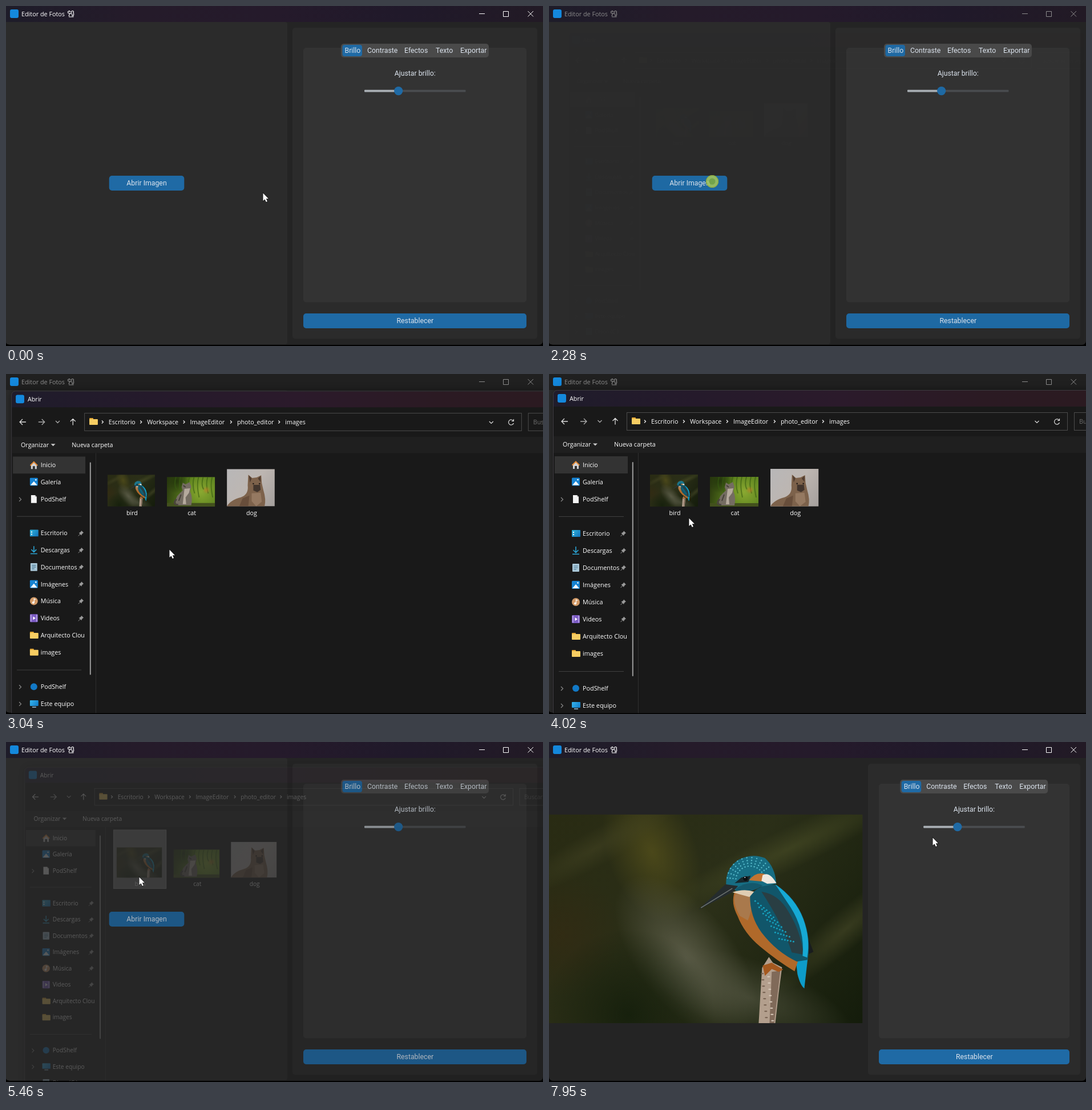
An HTML page with a canvas that plays this animation: 941 px wide and 595 px high, repeating every 8 s.

```html
<!DOCTYPE html>
<html lang="es">
<head>
<meta charset="utf-8">
<title>Editor de Fotos</title>
<style>
html, body { margin: 0; width: 100%; height: 100%; overflow: hidden; background: #000; }
canvas { display: block; }
</style>
</head>
<body>
<canvas id="stage" width="941" height="595"></canvas>
<script>
const W = 941, H = 595, LOOP = 8000;
const screen2d = document.getElementById('stage').getContext('2d');
const layer = Object.assign(document.createElement('canvas'), { width: W, height: H });
const layer2d = layer.getContext('2d');
let c = screen2d;

const UI = '12.3px Roboto, sans-serif';
const SYS = '10.8px "Open Sans", sans-serif';
const BLUE = '#1f6aa5', PALE = '#dce4ee', PANEL = '#2b2b2b', BACK = '#242424';

const clamp = v => Math.max(0, Math.min(1, v));
const ramp = (t, a, b) => clamp((t - a) / (b - a));

// ---- drawing helpers ----
function box(x, y, w, h, r, fill) {
  c.beginPath();
  c.roundRect(x, y, w, h, r);
  c.fillStyle = fill;
  c.fill();
}
function text(s, x, y, font, color, align = 'left') {
  c.font = font;
  c.textAlign = align;
  c.fillStyle = color;
  c.fillText(s, x, y);
}
function fill(d, color) {
  c.fillStyle = color;
  c.fill(new Path2D(d));
}
function stroke(d, color, width = 1) {
  c.strokeStyle = color;
  c.lineWidth = width;
  c.stroke(new Path2D(d));
}
function disc(x, y, r, color) {
  c.beginPath();
  c.arc(x, y, r, 0, 7);
  c.fillStyle = color;
  c.fill();
}
function at(x, y, draw, s = 1) {
  c.save();
  c.translate(x, y);
  c.scale(s, s);
  draw();
  c.restore();
}
function gradient(x0, y0, x1, y1, ...colors) {
  const g = c.createLinearGradient(x0, y0, x1, y1);
  colors.forEach((k, i) => g.addColorStop(i / (colors.length - 1), k));
  return g;
}
function glow(x, y, r, rgb, alpha, tilt = 0, flat = 1) {
  c.save();
  c.translate(x, y);
  c.rotate(tilt);
  c.scale(1, flat);
  const g = c.createRadialGradient(0, 0, 0, 0, 0, r);
  g.addColorStop(0, `rgba(${rgb},${alpha})`);
  g.addColorStop(1, `rgba(${rgb},0)`);
  c.fillStyle = g;
  c.fillRect(-r, -r, 2 * r, 2 * r);
  c.restore();
}
function photo(x, y, w, h, draw, width) {
  c.save();
  c.beginPath();
  c.rect(x, y, w, h);
  c.clip();
  c.translate(x, y);
  c.scale(w / width, w / width);
  draw();
  c.restore();
}

// ---- pictures ----
function bird() {
  c.fillStyle = gradient(0, 0, 549, 366, '#292b13', '#2b2f18', '#141c0b');
  c.fillRect(0, 0, 549, 366);
  glow(180, 65, 130, '92,86,28', .65, 1.2, .6);
  glow(20, 210, 110, '56,42,18', .5);
  glow(240, 250, 170, '104,104,84', .75, .9, .5);
  glow(350, 320, 190, '88,90,70', .6, .35, .35);
  glow(420, 60, 260, '74,78,38', .6, -.45, .14);
  glow(520, 200, 170, '72,74,40', .6, -.7, .2);
  glow(80, 60, 160, '70,70,36', .5, -.5, .2);
  glow(140, 350, 150, '14,26,8', .7);
  c.translate(0, -127);
  fill('M373 395L385 376L392 386L408 394L402 440L396 493H367Z', '#b39f8d');
  fill('M390 402L405 400L394 493H386Z', '#806a59');
  for (let i = 0; i < 16; i++)
    box(371 + i * 11 % 21, 404 + i * 5.5, 5, 2, 1, i % 2 ? '#d8cabb' : '#75604f');
  fill('M432 380L453 378L447 431Q440 426 435 406Z', '#0d9cc9');
  fill('M455 346L463 367L452 372Z', '#191c1d');
  fill('M325 262Q318 282 330 304Q342 335 370 358Q400 383 430 401L436 383L385 310L358 264Z', '#b0692a');
  fill('M326 266Q321 282 334 304L348 312Q358 290 353 266Z', '#a9794c');
  fill('M374 391L390 386L410 398L402 402L390 397L378 409Z', '#a5591f');
  fill('M352 268Q372 246 398 250Q432 273 446 310Q459 346 453 381L434 384Q398 367 372 333Q351 304 352 268Z', '#11566a');
  fill('M372 262Q402 266 420 298Q440 330 446 372L425 368Q410 320 372 262Z', '#293e43');
  fill('M396 249Q431 273 445 309Q458 344 452 377L444 374Q448 328 423 289Z', '#16a9d5');
  fill('M310 249Q309 221 332 206Q355 194 378 203Q396 219 398 248L382 251L330 262Z', '#176d83');
  fill('M327 257Q350 240 374 251Q362 261 330 265Z', '#14586c');
  fill('M350 242Q362 226 378 231L373 244Z', '#c27431');
  fill('M374 233Q386 226 398 247L382 248L372 243Z', '#eee8df');
  fill('M321 263Q342 256 359 262L351 271Z', '#dfcdb3');
  fill('M262 293L309 249L331 252L321 263Z', '#252c2e');
  stroke('M266 290L321 256', '#6e7472', 1.5);
  fill('M325 247L337 237L353 234L349 245Z', '#17272c');
  disc(344, 239, 4, '#0a0e10');
  disc(343, 237, 1, '#dde');
  for (let i = 0; i < 48; i++) {
    const a = 3.25 + i % 12 * .22, r = 25 + (i / 12 | 0) * 5;
    disc(352 + r * Math.cos(a), 242 + r * Math.sin(a), 1.2, '#55b9c9');
  }
  for (let i = 0; i < 42; i++) {
    const row = i / 6 | 0, col = i % 6;
    disc(361 + row * 7 + col * 5, 278 + row * 11 + col * 4 - row * col * .5, 1.5, '#16a0bd');
  }
}
function cat() {
  c.fillStyle = gradient(0, 0, 85, 20, '#27350e', '#5e831e', '#638922');
  c.fillRect(0, 0, 85, 52);
  glow(60, 26, 30, '156,184,56', .7);
  glow(18, 7, 22, '30,48,10', .8);
  for (let i = 0; i < 9; i++)
    stroke(`M${16 + i * 8} 0Q${12 + i * 8} 14 ${17 + i * 8} ${22 + i % 3 * 7}`, 'rgba(55,92,18,.6)', 2);
  glow(70, 23, 7, '191,126,40', .7);
  box(0, 46, 85, 6, 0, '#43511d');
  fill('M26 18L28 10L33 13L40 9L43 17L41 25Q46 36 43 50H18Q13 44 18 34Q24 27 28 24Z', '#746c61');
  fill('M31 21L41 20L39 28L33 36L34 48H28Z', '#b5aa9d');
  stroke('M20 49Q9 48 17 39', '#4a443d', 3);
  stroke('M25 31L21 42M29 15L33 18', '#453f38', 2);
}
function dog() {
  c.fillStyle = gradient(0, 0, 85, 66, '#b8b7b8', '#bdb6b1', '#a5a09d');
  c.fillRect(0, 0, 85, 66);
  fill('M0 66Q6 55 25 50Q39 45 37 29L38 10L45 16L53 15L61 11L62 25L65 38Q70 54 67 66Z', '#7d624b');
  fill('M39 11L44 17L41 24ZM60 12L55 17L60 23Z', '#513d30');
  fill('M47 28L59 28L60 37L54 41L47 38Z', '#42352d');
  fill('M44 43L60 42L62 58L52 66L44 57Z', '#957961');
  fill('M28 52L40 47L38 66H22Z', '#684e3b');
  disc(47, 26, 1.3, '#211a17');
  disc(58, 26, 1.3, '#211a17');
}

// ---- sidebar icons, each in a 14 px box ----
const folder = () => {
  box(0, 1, 7, 5, 1, '#e2a431');
  box(0, 3, 15, 10, 1, '#f7cd62');
};
const picture = () => {
  box(0, 0, 14, 14, 1.5, '#1683d2');
  fill('M1 13L7 6L13 13Z', '#f3f8fc');
  disc(10.5, 3.5, 1.3, '#fff');
};
const monitor = () => {
  box(0, 1, 15, 10, 1, gradient(0, 0, 15, 10, '#38b6ee', '#107cc8'));
  box(4, 12, 7, 2, 0, '#7e9cb0');
};
const icons = {
  home() {
    fill('M2 7L7 2L12 7V14H9V9H5V14H2Z', '#d2d2d4');
    stroke('M.7 7.8L7 1.4L13.3 7.8', '#e58a35', 2);
  },
  picture, folder, monitor,
  page() {
    fill('M2 0H9L12 3V14H2Z', '#f4f4f4');
    fill('M9 0V3H12Z', '#bbb');
  },
  desktop() {
    box(0, 1, 15, 12, 1, gradient(0, 0, 15, 12, '#30b7dc', '#1272ba'));
    box(2, 4, 2, 2, 0, '#fff');
    box(2, 8, 2, 2, 0, '#fff');
  },
  down() { stroke('M7 0V10M2.5 6L7 10.5L11.5 6M1 13.3H13', '#2ba4d3', 1.6); },
  doc() {
    box(1, 0, 12, 14, 1, '#a9c7d8');
    stroke('M3.5 4H10.5M3.5 7H10.5M3.5 10H8', '#41728f', 1.2);
  },
  music() {
    disc(7, 7, 7, '#d29a67');
    disc(6, 9.5, 2, '#fff');
    stroke('M7.5 9.5V3L10.5 4.5', '#fff', 1.3);
  },
  video() {
    box(0, 0, 14, 14, 1.5, '#7c5cc4');
    stroke('M2 1V13M12 1V13', '#c9b8ef', 1.3);
    fill('M5.5 4L10 7L5.5 10Z', '#fff');
  },
  cloud() { disc(7, 7, 6, '#1279c6'); }
};
// label, icon, centre y, pinned, expandable
const rows = [
  ['Inicio', 'home', 159], ['Galería', 'picture', 188.5], ['PodShelf', 'page', 219, 0, 1],
  ['Escritorio', 'desktop', 279, 1], ['Descargas', 'down', 309, 1], ['Documentos', 'doc', 339, 1],
  ['Imágenes', 'picture', 369, 1], ['Música', 'music', 399, 1], ['Videos', 'video', 429, 1],
  ['Arquitecto Clou', 'folder', 459], ['images', 'folder', 489],
  ['PodShelf', 'cloud', 550, 0, 1], ['Este equipo', 'monitor', 580, 0, 1], ['Disco (C:)', 'doc', 610, 0, 1]
];
const crumbs = [['Escritorio', 179], ['Workspace', 247], ['ImageEditor', 323], ['photo_editor', 406], ['images', 491]];
const files = [
  ['bird', 177, 176, 84, 56, bird, 549], ['cat', 282, 180, 85, 52, cat, 85], ['dog', 388, 166, 84.5, 66, dog, 85]
];

function dialog(itemColor) {
  c.save();
  c.shadowColor = 'rgba(0,0,0,.5)';
  c.shadowBlur = 14;
  box(8, 29, 1004, 626, 7, '#191919');
  c.restore();
  box(8, 29, 1004, 28, [7, 7, 0, 0], gradient(8, 0, 1012, 0, '#1f1c2b', '#251a2b', '#2b1a2b', '#2b1a23', '#2b1a20'));
  c.beginPath();
  c.roundRect(7.5, 28.5, 1005, 627, 7);
  c.strokeStyle = '#3d3b40';
  c.lineWidth = 1;
  c.stroke();
  box(15, 35, 15, 15, 3, '#1488dc');
  text('Abrir', 36, 47, SYS, '#fff');

  stroke('M33 83H22.5M27 78L22 83L27 88M111.5 82L116 77.5L120.5 82M116 78V88.5', '#ddd', 1.3);
  stroke('M55 83H65.5M61 78L66 83L61 88M85.5 81L89 84.5L92.5 81', '#aaa', 1.3);
  c.strokeStyle = '#4c4c4c';
  c.lineWidth = 1;
  c.strokeRect(136.5, 67.5, 772, 31);
  c.strokeRect(920.5, 67.5, 85, 31);
  at(145, 75, folder);
  for (const [label, x] of crumbs) {
    text(label, x, 87, SYS, '#fff');
    stroke(`M${x - 12} 80.5L${x - 9.5} 83L${x - 12} 85.5`, '#eee', 1.3);
  }
  stroke('M851.5 82L855 85.5L858.5 82M894 81A4.6 4.6 0 1 0 894.5 85M894.5 78V81.5H891', '#ddd', 1.2);
  text('Buscar en images', 929, 87, SYS, '#6f6f6f');

  box(8, 109, 1004, 29, 0, '#1f1f1f');
  text('Organizar', 24, 127, SYS, '#fff');
  fill('M77 121.5H85L81 125.5Z', '#ccc');
  text('Nueva carpeta', 114, 127, SYS, '#fff');

  box(10, 144, 128, 30, 0, '#333');
  box(156, 138, 1, 520, 0, '#303030');
  box(17, 249, 114, 1, 0, '#404040');
  box(17, 520, 114, 1, 0, '#404040');
  box(145.8, 154, 2, 375, 1, '#9b9b9b');
  c.save();
  c.beginPath();
  c.rect(8, 138, 131, 520);
  c.clip();
  for (const [label, icon, y, pinned, opens] of rows) {
    at(40, y - 7, icons[icon]);
    text(label, 59, y + 4, SYS, '#fff');
    if (opens) stroke(`M21 ${y - 3}L24.5 ${y + .5}L21 ${y + 4}`, '#8a8a8a', 1.2);
    if (pinned) at(130, y, () => {
      fill('M1 -4.5L5 -.5L3.5 0L1.5 2.5L1 4L-3.5 -.5L-2 -1L.5 -3Z', '#9a9a9a');
      stroke('M-1 1.5L-4.5 5', '#9a9a9a', 1);
    });
  }
  c.restore();

  if (itemColor) {
    box(171, 143.5, 98, 109, 0, itemColor);
    c.strokeStyle = 'rgba(255,255,255,.2)';
    c.strokeRect(171.5, 144, 97, 108);
  }
  for (const [label, x, y, w, h, draw, width] of files) {
    photo(x, y, w, h, draw, width);
    text(label, x + w / 2 + 1.5, 247, SYS, '#fff', 'center');
  }
}

// ---- main window ----
function titleBar(active, tint) {
  box(0, 0, W, 28, 0, '#202020');
  c.globalAlpha = tint;
  box(0, 0, W, 28, 0, gradient(0, 0, W, 0, '#1e1c29', '#251b2a', '#251a2b', '#20192a', '#221a25'));
  c.globalAlpha = 1;
  const ink = active ? '#fff' : '#8c8c8c';
  box(7, 6, 15, 15, 3, '#1488dc');
  text('Editor de Fotos', 27, 18, SYS, ink);
  stroke('M110 19H118.5M110.5 18Q110 14 113 13L109 12.5L108.5 10L111 8.5L113 10.5M113 13Q117 13 116 18' +
    'M117.5 18Q119.5 14 118 12Q119.5 9 116.5 8.5Q113.5 9 115 12', ink, 1.2);
  stroke('M829 13.5H839M871.5 9.5H880.5V18.5H871.5ZM914.5 9L924 18.5M924 9L914.5 18.5', ink, 1);
}

function controls(wide) {
  const left = wide ? 502 : 559, dx = wide ? 0 : 28.2, mid = 716.7 + dx;
  box(left, 38, 931 - left, 544.5, 5, PANEL);
  box(left + 19, 73, 893 - left, 445.5, 5, '#333');
  at(dx, 0, () => {
    box(587, 66, 259, 24, 5, '#4a4a4a');
    box(589.5, 68, 34.5, 20, 4, BLUE);
    for (const [label, x] of [['Brillo', 593.5], ['Contraste', 633], ['Efectos', 698], ['Texto', 753], ['Exportar', 796]])
      text(label, x, 82, UI, PALE);
    box(628, 146.8, 177.5, 3.8, 1, '#4a4d50');
    box(628, 146.8, 58, 3.8, 1, '#aab0b5');
    disc(687.7, 148.6, 7.6, BLUE);
  });
  text('Ajustar brillo:', mid, 122, UI, PALE, 'center');
  box(left + 19, 538, 893 - left, 26, 5, BLUE);
  text('Restablecer', (left + 931) / 2 + .3, 554.8, UI, PALE, 'center');
}

const LOADED = 6560, RELAID = 7025;

function editor(t, hover) {
  box(0, 0, W, H, 0, '#000');
  box(0, 0, W, 593, [0, 0, 7, 7], BACK);
  const active = t < 2230 || t >= 5230;
  titleBar(active, t < 5000 ? 1 - ramp(t, 2290, 2560) : ramp(t, 5230, 5330));
  if (t < LOADED) {
    box(0, 28, 493, 564, [0, 4, 4, 4], PANEL);
    box(180.7, 297, 131.6, 26, 5, hover ? '#144870' : BLUE);
    text('Abrir Imagen', 246.5, 314.2, UI, PALE, 'center');
  }
  controls(t < RELAID);
  if (t < LOADED) return;
  if (t < RELAID) {
    // half-finished repaint of the old layout
    box(490, 28, 59, 564, 0, BACK);
    box(559, 38, 19, 544.5, 0, PANEL);
    box(578, 66, 66, 7, 0, PANEL);
  }
  photo(0, 127, 549.5, 365, bird, 549);
}

// ---- pointer ----
const path = [
  [0, 450, 327], [190, 450, 327], [1000, 365, 316], [1090, 365, 316], [1820, 298, 309], [2100, 286, 307],
  [3100, 286, 307], [3480, 280, 297], [4020, 245, 252], [4380, 235, 239], [4600, 233, 236],
  [5700, 233, 236], [6110, 270, 232], [6910, 447, 187], [7010, 468, 184], [7830, 665, 165],
  [7920, 665, 165], [7950, 672, 167], [LOOP, 672, 167]
];
const clicks = [2270, 4880, 5070];

function pointerAt(t) {
  const i = path.findIndex(p => p[0] > t);
  const [t0, x0, y0] = path[i - 1], [t1, x1, y1] = path[i];
  const k = ramp(t, t0, t1);
  return [x0 + (x1 - x0) * k, y0 + (y1 - y0) * k];
}
function pointer(t, x, y) {
  if (clicks.some(k => Math.abs(t - k) < 75)) {
    disc(x, y, 11, 'rgba(166,200,88,.85)');
    stroke(`M${x - 10.5} ${y}a10.5 10.5 0 1 0 21 0a10.5 10.5 0 1 0 -21 0`, '#8fa637', 1);
    disc(x, y, 5.5, 'rgba(108,158,70,.8)');
    return;
  }
  at(x, y, () => {
    const arrow = 'M.5 .5V14L3.6 11.2L5.8 16L8 15L5.8 10.3H10Z';
    stroke(arrow, '#111', 1.4);
    fill(arrow, '#fff');
  });
}

function frame(now) {
  const t = now % LOOP;
  const [x, y] = pointerAt(t);
  editor(t, t > 1100 && x < 312 && t < 2180);

  const opening = t < 4500;
  const alpha = opening ? ramp(t, 2280, 2680) : 1 - ramp(t, 5250, 5520);
  if (alpha > 0) {
    const s = opening ? 1 - .1 * (1 - ramp(t, 2280, 3480)) ** 2.5 : 1 - .05 * Math.max(0, t - 5250) / 210;
    const [cx, cy] = opening ? [274, 207] : [510, 342];
    c = layer2d;
    c.setTransform(1, 0, 0, 1, 0, 0);
    c.clearRect(0, 0, W, H);
    c.setTransform(s, 0, 0, s, cx * (1 - s), cy * (1 - s));
    dialog(t > 4880 ? '#777' : t > 4025 ? '#4d4d4d' : '');
    c = screen2d;
    c.globalAlpha = alpha;
    c.drawImage(layer, 0, 0);
    c.globalAlpha = 1;
    box(0, 593.5, W, 2, 0, '#000');
  }
  pointer(t, x, y);
}

const start = performance.now();
function tick() {
  frame(performance.now() - start);
  requestAnimationFrame(tick);
}
tick();
</script>
</body>
</html>
```
